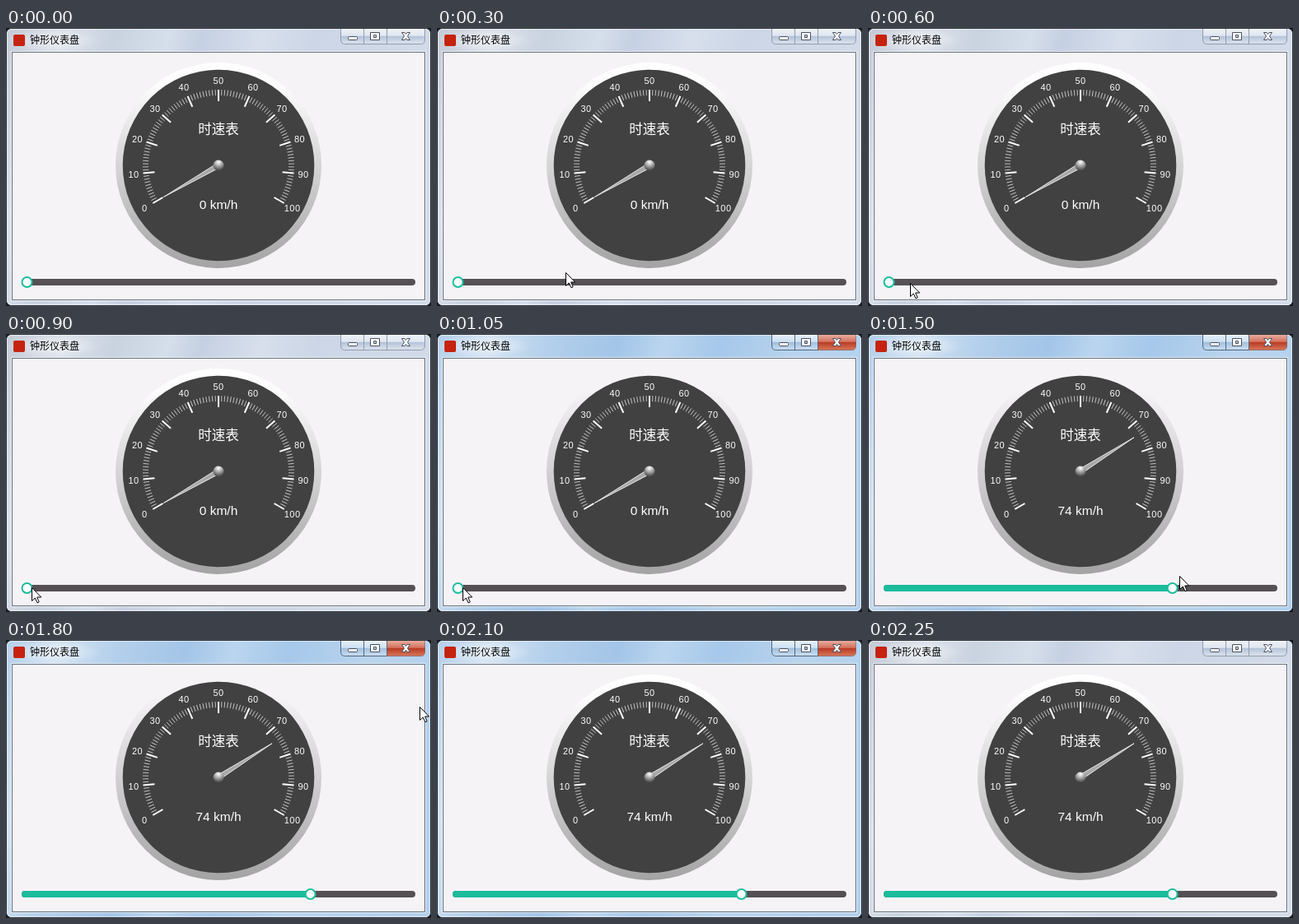
Animation of 516 by 338 pixels, one loop 2.4 s. Source, as an HTML page:

```html
<!DOCTYPE html>
<html lang="zh">
<head>
<meta charset="utf-8">
<title>钟形仪表盘</title>
<style>
  html, body { margin: 0; width: 100%; height: 100%; overflow: hidden; background: #15181c; }
  svg { display: block; }
  text { font-family: "Liberation Sans", "Noto Sans CJK SC", "Noto Sans CJK", sans-serif; }
  #dial text { fill: #fff; text-anchor: middle; }
  #labels { font-size: 11px; letter-spacing: .4px; }
</style>
</head>
<body>
<svg width="516" height="338" viewBox="0 0 516 338">
  <defs>
    <linearGradient id="idle" gradientUnits="userSpaceOnUse" x2="516" y2="150">
      <stop stop-color="#c3cad6"/><stop offset=".13" stop-color="#dbe1ea"/>
      <stop offset=".24" stop-color="#c9d3e0"/><stop offset=".36" stop-color="#d5dfeb"/>
      <stop offset=".43" stop-color="#c5d0e2"/><stop offset=".56" stop-color="#d7dfec"/>
      <stop offset=".68" stop-color="#ccd6e6"/><stop offset="1" stop-color="#d4dcea"/>
    </linearGradient>
    <linearGradient id="focus" gradientUnits="userSpaceOnUse" x2="516" y2="150">
      <stop stop-color="#b4cfea"/><stop offset=".12" stop-color="#d2e2f2"/>
      <stop offset=".25" stop-color="#b3cfeb"/><stop offset=".4" stop-color="#a3c5e8"/>
      <stop offset=".5" stop-color="#bad5ef"/><stop offset=".62" stop-color="#a6c8ea"/>
      <stop offset=".8" stop-color="#b9d4ee"/><stop offset="1" stop-color="#b2d0ee"/>
    </linearGradient>
    <linearGradient id="ringIdle" x2="0" y2="1">
      <stop stop-color="#fff"/><stop offset=".12" stop-color="#fbfbfb"/><stop offset="1" stop-color="#a4a3a4"/>
    </linearGradient>
    <linearGradient id="ringFocus" x2="0" y2="1">
      <stop offset=".1" stop-color="#f6f3f7"/><stop offset="1" stop-color="#a4a3a4"/>
    </linearGradient>
    <linearGradient id="close" x2="0" y2="1">
      <stop stop-color="#e8ac9f"/><stop offset=".45" stop-color="#d4735e"/>
      <stop offset=".5" stop-color="#b93b24"/><stop offset="1" stop-color="#d9775a"/>
    </linearGradient>
    <linearGradient id="glass" x2="0" y2="1">
      <stop stop-color="#fff" stop-opacity=".65"/><stop offset=".45" stop-color="#fff" stop-opacity=".35"/>
      <stop offset=".5" stop-color="#6d90b5" stop-opacity=".3"/><stop offset="1" stop-color="#fff" stop-opacity=".25"/>
    </linearGradient>
    <radialGradient id="hub" cx=".5" cy=".2" r=".75">
      <stop stop-color="#fff"/><stop offset=".5" stop-color="#a5a5a5"/><stop offset="1" stop-color="#4a4a4a"/>
    </radialGradient>
    <radialGradient id="glow"><stop stop-color="#fff" stop-opacity=".6"/><stop offset="1" stop-color="#fff" stop-opacity="0"/></radialGradient>
  </defs>

  <rect id="frame" x=".5" y=".5" width="515" height="337" rx="6" stroke="#2f353d"/>
  <rect x="1.5" y="1.5" width="513" height="335" rx="5" fill="none" stroke="#fff" stroke-opacity=".6"/>
  <ellipse cx="58" cy="15" rx="58" ry="14" fill="url(#glow)"/>
  <rect x="9" y="8" width="14" height="14" rx="2" fill="#c5230f"/>
  <text x="29" y="19" font-size="12">钟形仪表盘</text>

  <g id="buttons">
    <path id="box" d="M406.500 1V14Q406.500 19.500 411.500 19.500H503.500Q508.500 19.500 508.500 14V1" fill="url(#glass)"/>
    <path id="closeBox" d="M462.500 1V19.500H503.500Q508.500 19.500 508.500 14V1Z" fill="url(#close)"/>
    <path id="lines" d="M434.500 1V19M462.500 1V19" fill="none"/>
    <g fill="#fff" stroke="#4b5260">
      <rect x="415.500" y="10.500" width="11" height="4" rx="1"/>
      <path fill-rule="evenodd" d="M442.500 5.500H453.500V14.500H442.500ZM446.500 8.500V11.500H449.500V8.500Z"/>
      <path d="M480.500 5.500H484L485.500 7.500L487 5.500H490.500L487.500 10L490.500 14.500H487L485.500 12.500L484 14.500H480.500L483.500 10Z"/>
    </g>
  </g>

  <rect x="6.500" y="28.500" width="503" height="303" fill="none" stroke="#fff" stroke-opacity=".6"/>
  <rect x="7.500" y="29.500" width="501" height="301" fill="#f6f3f7" stroke="#68727e"/>

  <g id="dial" transform="translate(258 167)">
    <circle id="ring" r="125"/>
    <circle r="116.300" fill="#424142"/>
    <g id="ticks" stroke="#fff"></g>
    <g id="labels"></g>
    <text y="-38" font-size="16.500">时速表</text>
    <text id="speed" y="53" font-size="15.500"></text>
    <path id="needle" d="M-3 0L0 -77L3 0Z" fill="#a9a8a9" stroke="#f4f4f4" stroke-width=".8"/>
    <circle r="6.500" fill="url(#hub)"/>
  </g>

  <rect x="19" y="305" width="478" height="8" rx="4" fill="#545053"/>
  <rect id="fill" x="19" y="305" height="8" rx="4" fill="#1abc9c"/>
  <circle id="knob" cy="309" r="6" fill="#fff" stroke="#1abc9c" stroke-width="2"/>
  <path id="cursor" d="M.5 .5V16.500L4.300 13L7 18.800L9.200 17.800L6.700 12H11.700Z" fill="#fff" stroke="#000"/>
</svg>
<script>
  const STEP = 150, LOOP = 2400;
  const $ = id => document.getElementById(id);
  const set = (id, attrs) => {
    for (const key in attrs) $(id).setAttribute(key, attrs[key]);
  };
  const angle = value => value * 2.4 - 120;

  let ticks = '', labels = '';
  for (let v = 0; v <= 100; v++) {
    const major = v % 10 === 0;
    ticks += `<path d="M0 -92V${major ? -78 : -85}" transform="rotate(${angle(v)})" ` +
      `stroke-width="${major ? 2 : 0.8}" opacity="${major ? 1 : 0.8}"/>`;
    if (major) {
      const a = angle(v) * Math.PI / 180;
      labels += `<text x="${103.5 * Math.sin(a)}" y="${4 - 103.5 * Math.cos(a)}">${v}</text>`;
    }
  }
  $('ticks').innerHTML = ticks;
  $('labels').innerHTML = labels;

  // Pointer position and gauge value, sampled every STEP ms
  const pointer = [
    null, [367, 274], [156, 297], [87, 305], [51, 310], [34, 310], [31, 308], [31, 308],
    [140, 315], [280, 304], [378, 294], [446, 305], [502, 81]
  ];
  const speeds = [0, 0, 0, 0, 0, 0, 0, 0, 16, 50];

  function draw(now) {
    const step = Math.floor(now % LOOP / STEP);
    const value = speeds[step] ?? 74;
    const active = step >= 7 && step < 15;
    const knobX = 25.5 + value * 4.65;
    const at = pointer[step];

    set('frame', { fill: `url(#${active ? 'focus' : 'idle'})` });
    set('ring', { fill: `url(#${step >= 7 && step < 14 ? 'ringFocus' : 'ringIdle'})` });
    set('closeBox', { visibility: active ? 'visible' : 'hidden' });
    for (const id of ['box', 'lines']) set(id, { stroke: active ? '#55677d' : '#929cab' });
    set('needle', { transform: `rotate(${angle(value)})` });
    set('fill', { width: value ? knobX - 19 : 0 });
    set('knob', { cx: knobX });
    set('cursor', at ? { visibility: 'visible', transform: `translate(${at})` } : { visibility: 'hidden' });
    $('speed').textContent = `${value} km/h`;
    requestAnimationFrame(draw);
  }
  draw(0);
</script>
</body>
</html>
```
